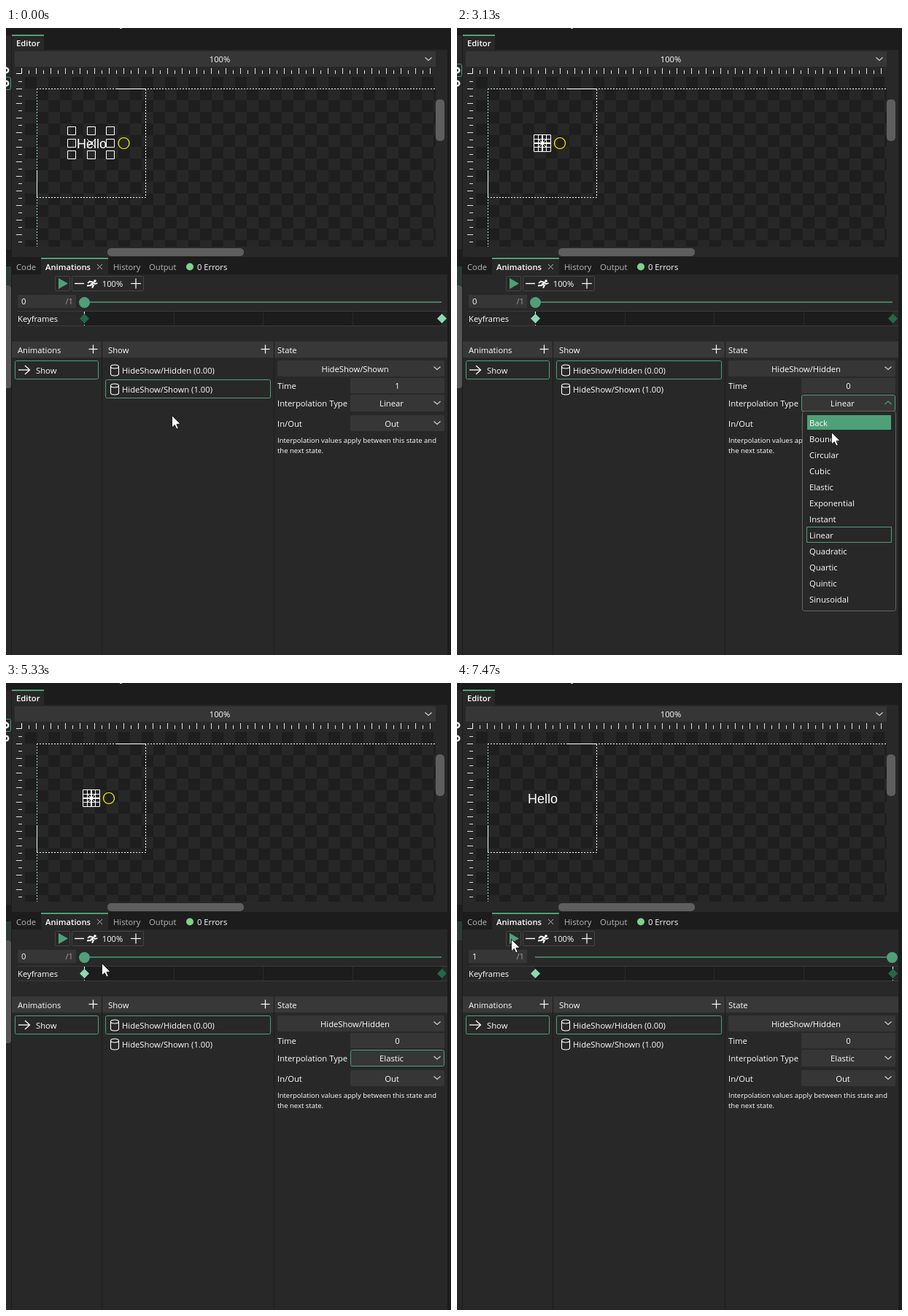
An HTML page with a canvas that plays this animation: 610x860 px, repeating every 8000 ms.

```html
<!DOCTYPE html>
<html lang="en">
<head>
<meta charset="utf-8">
<title>State animation editor</title>
<style>
html, body { margin: 0; width: 100%; height: 100%; overflow: hidden; background: #1c1c1c; }
canvas { display: block; }
</style>
</head>
<body>
<canvas id="stage" width="610" height="860"></canvas>
<script>
const ctx = document.getElementById('stage').getContext('2d');
const LOOP = 8000, STEP = 200 / 3;
const BG = '#282828', DARK = '#1c1c1c', FIELD = '#363636', LINE = '#464646';
const GREEN = '#4fa078', WHITE = '#ffffff', GRAY = '#b8b8b8';
const BRIGHT_KEY = '#8cdab0', DIM_KEY = '#22694a', HOVER = '#2d3b35';
const DASH = [2, 2];
const TYPES = ['Back', 'Bounce', 'Circular', 'Cubic', 'Elastic', 'Exponential',
  'Instant', 'Linear', 'Quadratic', 'Quartic', 'Quintic', 'Sinusoidal'];

const EASE = {
  in: u => u * u,
  out: u => u * (2 - u),
  both: u => u * u * (3 - 2 * u)
};
// time, x, y, easing of the move that ends here
const POINTER = [
  [0, 228, 531], [0, 228, 531, 'both'], [467, 251, 472, 'both'], [1267, 251, 472, 'both'],
  [1800, 494, 511, 'both'], [1933, 502, 511, 'out'], [2800, 502, 511, 'both'],
  [3133, 514, 554, 'in'], [3667, 518, 629, 'out'], [4600, 518, 629, 'both'],
  [5400, 124, 379, 'both'], [6000, 75, 351, 'out'], [LOOP, 75, 351, 'both']
];

function pointerAt(t) {
  const i = POINTER.findIndex(p => p[0] > t);
  const [t0, x0, y0] = POINTER[i - 1], [t1, x1, y1, ease] = POINTER[i];
  const u = EASE[ease]((t - t0) / (t1 - t0));
  return { x: Math.round(x0 + (x1 - x0) * u), y: Math.round(y0 + (y1 - y0) * u) };
}

function elasticOut(u) {
  if (u <= 0 || u >= 1) return u <= 0 ? 0 : 1;
  return 1 + 2 ** (-10 * u) * Math.sin((u - 0.075) * 2 * Math.PI / 0.3);
}

function rect(x, y, w, h, fill) {
  ctx.fillStyle = fill;
  ctx.fillRect(x, y, w, h);
}

function box(x, y, w, h, fill, stroke, radius = 2) {
  const inset = stroke ? 0.5 : 0;
  ctx.beginPath();
  ctx.roundRect(x + inset, y + inset, w - 2 * inset, h - 2 * inset, radius);
  if (fill) { ctx.fillStyle = fill; ctx.fill(); }
  if (stroke) { ctx.strokeStyle = stroke; ctx.lineWidth = 1; ctx.stroke(); }
}

function path(points, color, width = 1, dash = []) {
  ctx.beginPath();
  points.forEach(([x, y]) => ctx.lineTo(x, y));
  ctx.strokeStyle = color;
  ctx.lineWidth = width;
  ctx.setLineDash(dash);
  ctx.stroke();
  ctx.setLineDash([]);
}

function polygon(points, fill) {
  ctx.beginPath();
  points.forEach(([x, y]) => ctx.lineTo(x, y));
  ctx.closePath();
  ctx.fillStyle = fill;
  ctx.fill();
}

function disc(x, y, r, fill) {
  ctx.beginPath();
  ctx.arc(x, y, r, 0, 7);
  ctx.fillStyle = fill;
  ctx.fill();
}

function text(str, x, middle, { color = WHITE, size = 11.25, weight = 500, align = 'left' } = {}) {
  ctx.font = `${weight} ${size}px "Open Sans", "Noto Sans", sans-serif`;
  ctx.textAlign = align;
  ctx.fillStyle = color;
  ctx.fillText(str, x, Math.round(middle + 4));
}

function plus(x, y, r) {
  path([[x - r, y], [x + r, y]], WHITE, 1.2);
  path([[x, y - r], [x, y + r]], WHITE, 1.2);
}

function chevron(x, y, up, color = '#d0d0d0') {
  const d = up ? -2 : 2;
  path([[x - 4.5, y - d], [x, y + d], [x + 4.5, y - d]], color, 1.3);
}

function diamond(x, y, fill) {
  polygon([[x, y - 6.5], [x + 6.5, y], [x, y + 6.5], [x - 6.5, y]], fill);
}

function gear(y) {
  ctx.beginPath();
  ctx.arc(0, y, 3.2, -1.6, 1.6);
  ctx.strokeStyle = '#f0f0f0';
  ctx.lineWidth = 2.5;
  ctx.stroke();
}

function drawLeftStrip(hiddenSelected, playing) {
  rect(0, 10, 7, 294, BG);
  rect(0, 327, 7, 533, BG);
  rect(0, 327, 7, 26, HOVER);
  gear(58);
  gear(76);
  if (playing) return;
  box(-5, hiddenSelected ? 49 : 67, 12, 18, null, GREEN);
  box(-8, 353, 15, 141, '#565656', null, 4);
}

function drawRulers() {
  path([[14, 62.5], [21.5, 62.5], [21.5, 55]], WHITE);
  for (let x = 31; x < 590; x += 10) {
    const long = (x - 41) % 20 === 0;
    rect(x, long ? 55 : 58, 1, long ? 8 : 5, '#e2e2e2');
  }
  for (let y = 73; y < 300; y += 10) {
    const long = (y - 83) % 20 === 0;
    rect(long ? 14 : 17, y, long ? 8 : 5, 1, '#e2e2e2');
  }
}

function drawHandles(halfW, halfH) {
  const dx = halfW + 6, dy = halfH + 6;
  for (const i of [-1, 0, 1]) for (const j of [-1, 0, 1]) {
    if (i || j) box(Math.floor(111 + i * dx), Math.floor(152 + j * dy), 12, 12, null, '#fff', 0);
  }
  path([[111, 152], [123, 164]], '#fff');
  path([[123, 152], [111, 164]], '#fff');
  ctx.beginPath();
  ctx.arc(117 + halfW + 24, 158, 7.5, 0, 7);
  ctx.strokeStyle = '#ffff00';
  ctx.lineWidth = 1.2;
  ctx.stroke();
}

function drawEditor(hiddenSelected, playing, scale) {
  rect(8, 10, 44, 21, BG);
  rect(8, 9, 44, 2, GREEN);
  rect(156, 0, 3, 1, '#c8c8c8');
  text('Editor', 14, 21, { weight: 600 });
  rect(8, 30, 597, 284, BG);
  rect(12, 32, 577, 21, FIELD);
  text('100%', 293, 42.5, { align: 'center' });
  chevron(579, 42.5);
  drawRulers();

  ctx.save();
  ctx.beginPath();
  ctx.rect(26, 67, 563, 233);
  ctx.clip();
  rect(26, 67, 563, 233, '#1e1e1e');
  for (let i = -1; i < 35; i++) for (let j = -1; j < 14; j++) {
    if ((i + j) & 1) rect(42 + i * 16, 83 + j * 16, 16, 16, '#272727');
  }
  path([[42, 83.5], [589, 83.5]], '#ffffff', 1, DASH);
  path([[42.5, 83], [42.5, 300]], '#9fd6da', 1, DASH);
  path([[42, 232.5], [191.5, 232.5], [191.5, 83.5]], '#fff', 1, DASH);
  path([[42.5, 195], [42.5, 232]], '#e8f4f4');
  path([[152, 83.5], [191, 83.5]], '#fff');
  if (scale > 0) {
    ctx.save();
    ctx.translate(117.5, 158);
    ctx.scale(scale, scale);
    ctx.font = '18px "Liberation Sans", Arial, sans-serif';
    ctx.textAlign = 'center';
    ctx.fillStyle = '#fff';
    ctx.fillText('Hello', 0, 7);
    ctx.restore();
  }
  if (!playing) hiddenSelected ? drawHandles(0, 0) : drawHandles(20.5, 10.5);
  ctx.restore();

  box(589, 98, 12, 57, '#5e5e5e', null, 5);
  box(139, 302, 187, 11, '#5e5e5e', null, 5);
}

function drawTabs() {
  rect(8, 338, 597, 522, BG);
  rect(48, 316, 92, 22, BG);
  rect(48, 315, 92, 2, GREEN);
  text('Code', 14, 328, { color: GRAY });
  text('Animations', 54, 328, { weight: 600 });
  path([[125, 324], [132, 331]], GRAY);
  path([[132, 324], [125, 331]], GRAY);
  text('History', 147, 328, { color: GRAY });
  text('Output', 196, 328, { color: GRAY });
  disc(252, 327.5, 5, '#7fd28a');
  text('0 Errors', 262, 328);
}

function drawRunner() {
  disc(122, 347, 1.8, WHITE);
  path([[112, 350], [115, 347.5], [120, 349], [116, 353], [111, 353.5]], WHITE, 2);
  path([[119, 349], [122, 351], [125.5, 350]], WHITE, 1.7);
  path([[116, 351], [120, 353], [118, 356.5]], WHITE, 2);
}

function drawTimeline(progress, keyColors) {
  box(67, 340, 21, 21, null, LINE, 1);
  polygon([[72, 343], [85, 350.5], [72, 358]], GREEN);
  box(90, 340, 99, 21, null, LINE, 1);
  path([[94, 350.5], [107, 350.5]], WHITE, 1.4);
  drawRunner();
  text('100%', 146, 350.5, { align: 'center' });
  plus(178, 350.5, 7);

  rect(16, 366, 80, 18, FIELD);
  text(String(+progress.toFixed(2)), 21, 375);
  text('/1', 92, 375, { color: '#a0a0a0', align: 'right' });
  rect(107, 375, 490, 2, '#40805f');
  disc(107.5 + 489 * progress, 376.5, 7.5, GREEN);

  rect(16, 388, 589, 1, '#3a3a3a');
  rect(16, 408, 589, 1, '#3a3a3a');
  text('Keyframes', 16, 398.5);
  rect(107, 389, 490, 19, DARK);
  for (const x of [230, 352, 475]) rect(x, 389, 1, 19, '#2a2a2a');
  const head = Math.round(107 + 490 * progress) + 0.5;
  path([[head, 389], [head, 408]], WHITE, 1, [4, 2]);
  diamond(107.5, 398.5, keyColors[0]);
  diamond(597.5, 398.5, keyColors[1]);
}

function drawRow(label, y, selected, hovered) {
  if (selected || hovered) box(136, y, 227, 26, hovered ? HOVER : null, selected ? GREEN : null);
  const top = y + 8.5;
  ctx.beginPath();
  ctx.ellipse(149, top, 5.5, 2.5, 0, 0, 2 * Math.PI);
  ctx.moveTo(143.5, top);
  ctx.lineTo(143.5, top + 10);
  ctx.ellipse(149, top + 10, 5.5, 2.5, 0, Math.PI, 0, true);
  ctx.lineTo(154.5, top);
  ctx.strokeStyle = WHITE;
  ctx.lineWidth = 1.1;
  ctx.stroke();
  text(label, 159, y + 13.5);
}

function drawLists(hiddenSelected, hoveredRow) {
  rect(8, 430, 597, 22, '#383838');
  rect(131, 430, 1, 430, DARK);
  rect(367, 430, 1, 430, DARK);
  text('Animations', 16, 441.5);
  plus(119.5, 440.5, 6);
  text('Show', 140, 441.5);
  plus(355.5, 440.5, 6);
  text('State', 372, 441.5);
  box(12, 456, 115, 26, null, GREEN);
  path([[17, 469], [32, 469]], WHITE, 1.3);
  path([[26, 463], [32.5, 469], [26, 475]], WHITE, 1.3);
  text('Show', 41, 469.5);
  drawRow('HideShow/Hidden (0.00)', 456, hiddenSelected, hoveredRow === 0);
  drawRow('HideShow/Shown (1.00)', 482, !hiddenSelected, hoveredRow === 1);
}

function combo(label, x, y, w, h, labelX, focused, open) {
  box(x, y, w, h, FIELD, focused ? GREEN : null);
  text(label, labelX, y + h / 2 + 0.5, { align: 'center' });
  chevron(591, y + h / 2 - 0.5, open, open ? GREEN : undefined);
}

function drawState(hiddenSelected, type, focused, open) {
  combo(hiddenSelected ? 'HideShow/Hidden' : 'HideShow/Shown', 372, 456, 229, 22, 478.5);
  text('Time', 372, 491);
  rect(472, 480, 129, 21, FIELD);
  text(hiddenSelected ? '0' : '1', 536.5, 491, { align: 'center' });
  text('Interpolation Type', 372, 515);
  combo(type, 472, 503, 129, 23, 528.5, focused, open);
  text('In/Out', 372, 543);
  combo('Out', 472, 531, 129, 22, 529, false);
  text('Interpolation values apply between this state and', 372, 564.5, { size: 9.5 });
  text('the next state.', 372, 578.5, { size: 9.5 });
}

function drawPopup(reveal, highlighted) {
  const height = 275;
  ctx.save();
  ctx.beginPath();
  ctx.rect(472, 525, 131, height * reveal);
  ctx.clip();
  ctx.translate(0, height * (reveal - 1));
  box(473, 525, 129, height, BG, '#646464', 3);
  TYPES.forEach((name, i) => {
    const y = 531 + 22 * i;
    if (i === highlighted) rect(480, y, 115, 20, GREEN);
    else if (name === 'Linear') box(479, y - 1, 117, 22, null, GREEN, 0);
    text(name, 483, y + 10.5);
  });
  ctx.restore();
}

function drawPointer({ x, y }) {
  ctx.save();
  ctx.translate(x - 0.5, y + 0.5);
  const shape = [[0, 0], [0, 16.5], [3.8, 13], [6.3, 18.5], [8.8, 17.4], [6.4, 12], [11.5, 11.5]];
  polygon(shape, '#fff');
  path([...shape, [0, 0]], '#111', 0.9);
  ctx.restore();
}

function draw(t) {
  const hiddenSelected = t >= 1000, playing = t >= 6467;
  const open = t >= 2133 && t < 4067;
  const focused = t >= 2133 && t < 6400;
  const progress = Math.min(1, Math.max(0, (t - 6467) / 1000));
  const scale = playing ? elasticOut(progress) : hiddenSelected ? 0 : 1;
  const pointer = pointerAt(t);
  const overRows = pointer.x >= 136 && pointer.x < 363 && pointer.y >= 456 && pointer.y < 508;
  const hoveredRow = overRows ? Math.floor((pointer.y - 456) / 26) : -1;
  const keyColors = [0, 1].map(i =>
    hoveredRow === i || hiddenSelected === (i === 0) ? BRIGHT_KEY : DIM_KEY);

  rect(0, 0, 610, 860, DARK);
  drawLeftStrip(hiddenSelected, playing);
  drawEditor(hiddenSelected, playing, scale);
  drawTabs();
  drawTimeline(progress, keyColors);
  drawLists(hiddenSelected, hoveredRow);
  drawState(hiddenSelected, t < 4067 ? 'Linear' : 'Elastic', focused, open);
  if (open && t > 2133) {
    const row = pointer.y < 525 ? TYPES.indexOf('Linear') : Math.max(0, Math.floor((pointer.y - 534) / 22));
    drawPopup(EASE.out(Math.min(1, (t - 2133) / 200)), row);
  }
  drawPointer(pointer);
}

function frame() {
  const t = performance.now() % LOOP;
  draw(Math.min(LOOP - 1, Math.round(Math.floor(t / STEP + 0.06) * STEP)));
  requestAnimationFrame(frame);
}
frame();
</script>
</body>
</html>
```
